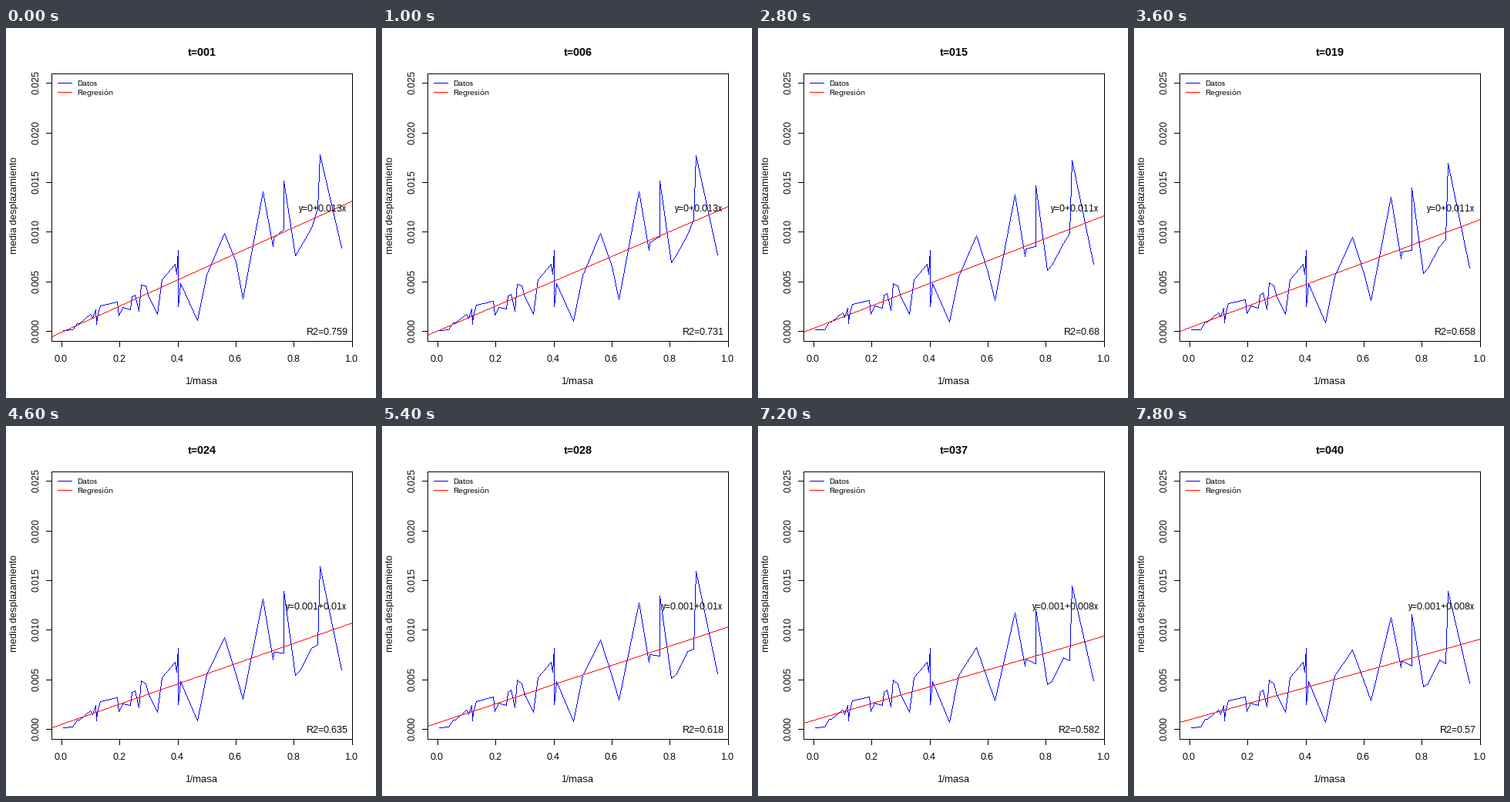
Write a matplotlib script that moves like this. It is 480 px wide and 480 px high and loops after 8 s.

```python
import matplotlib.pyplot as plt
import numpy as np
from matplotlib.animation import FuncAnimation

SIZE, DPI, FRAMES, STEP_MS = 480, 100, 40, 200
PT = 72 / DPI                                  # points per pixel
LEFT, RIGHT, TOP, BOTTOM = 59, 449, 59, 406    # plot box, pixels
X0, X_UNIT = 72.5, 376.5                       # pixel of x = 0, pixels per unit
Y0, Y_UNIT = 393.7, 12872                      # pixel of y = 0, pixels per unit
BLUE, RED = "#0000ff", "#ff0000"

plt.rcParams.update({
    "font.family": "Liberation Sans",
    "text.hinting": "native",
    "text.hinting_factor": 1,
    "text.kerning_factor": 6,
    "path.simplify": False,
})

# Heavy masses hardly move: pixel x, displacement (1e-4).
HEAVY = np.array([
    (74, 1), (86, 1.5), (92, 8), (95, 8), (109, 17), (112, 13), (116, 22),
    (117, 7), (118, 15), (122, 26), (144, 30), (146, 16), (151, 24),
    (161, 22), (163, 35), (167, 37), (172, 20), (175, 47), (181, 46),
    (185, 34), (196, 17), (202, 52), (219, 68), (221, 58), (223, 82),
    (223, 25), (226, 48),
])

# Light masses slow down: pixel x, first and last displacement (1e-4).
LIGHT = np.array([
    (248, 11, 7), (260, 57, 54), (283, 99, 80), (298, 70, 48),
    (307, 33, 29), (333, 141, 113), (346, 86, 62), (347, 94, 69),
    (360, 103, 64), (360, 152, 116), (375, 76, 43), (381, 84, 46),
    (396, 104, 70), (404, 124, 66), (407, 178, 139), (435, 84, 47),
])

# Goodness of fit at a few steps.
R2_T = (1, 10, 19, 24, 28, 33, 40)
R2 = (.759, .708, .658, .635, .618, .597, .57)

fig = plt.figure(figsize=(SIZE / DPI, SIZE / DPI), dpi=DPI, facecolor="white")
ax = fig.add_axes((0, 0, 1, 1))
ax.set(xlim=(0, SIZE), ylim=(SIZE, 0))
ax.axis("off")


def pixel_path(xs, ys):
    """Unit dashes over each pixel of a hard-edged, one pixel wide polyline."""
    xs, ys = np.floor(xs), np.floor(ys)
    px, py = [], []
    for x1, y1, x2, y2 in zip(xs, ys, xs[1:], ys[1:]):
        n = int(max(abs(x2 - x1), abs(y2 - y1))) + 1
        px.append(np.floor(np.linspace(x1, x2, n) + .5))
        py.append(np.floor(np.linspace(y1, y2, n) + .5))
    px, py = np.concatenate(px), np.concatenate(py) + .5
    gap = np.full_like(px, np.nan)
    return np.c_[px, px + 1, gap].ravel(), np.c_[py, py, gap].ravel()


def stroke(xs, ys, color="black"):
    return ax.plot(*pixel_path(xs, ys), color=color, lw=PT, snap=False,
                   solid_capstyle="butt")[0]


def label(x, y, text, px=12, ha="center", **kw):
    return ax.text(x, y, text, size=px * PT, ha=ha, va="baseline", **kw)


def upright(x, y, text):
    label(x, y, text, rotation=90, rotation_mode="anchor")


def to_y(value):
    return Y0 - value * Y_UNIT


def data_y(u):
    x, y = HEAVY.T
    heavy = y + np.where(x < 180, 3 * (1 - (1 - u) ** 2) * y / (y + 4), 0)
    x, first, last = LIGHT.T
    steep = first / (x - X0) * X_UNIT > 160
    light = first + (last - first) * u ** np.where(steep, 2, .8)
    return to_y(np.concatenate([heavy, light]) * 1e-4)


def fit_at(u):
    """Intercept and slope of the regression line."""
    return (-.07 + 1.08 * u) * 1e-3, (13.18 - 5.09 * u) * 1e-3


data_x = np.concatenate([HEAVY[:, 0], LIGHT[:, 0]])
data = stroke(data_x, data_y(0), BLUE)
fit = stroke([LEFT, RIGHT], [BOTTOM, TOP], RED)

stroke([LEFT, RIGHT, RIGHT, LEFT, LEFT], [TOP, TOP, BOTTOM, BOTTOM, TOP])
for k in range(6):
    x = X0 + k * .2 * X_UNIT
    stroke([x, x], [BOTTOM, BOTTOM + 7])
    label(x - 1, 433, f"{k * .2:.1f}")
    y = to_y(k * .005)
    stroke([LEFT - 7, LEFT], [y, y])
    upright(43, y - 1, f"{k * .005:.3f}")
label(253.5, 462, "1/masa")
upright(14, 230, "media desplazamiento")

for row, name, color in ((71, "Datos", BLUE), (83, "Regresión", RED)):
    stroke([67, 85], [row, row], color)
    label(92.5, row + 4, name, 10, "left")

title = label(254, 36, "", 14, weight="bold")
formula = label(441.5, 238, "", ha="right")
score = label(444, 398, "", ha="right")


def draw(i):
    t, u = i + 1, i / (FRAMES - 1)
    a, b = fit_at(u)
    ends = np.array([LEFT, RIGHT])
    data.set_data(*pixel_path(data_x, data_y(u)))
    fit.set_data(*pixel_path(ends, to_y(a + b * (ends - X0) / X_UNIT)))
    title.set_text(f"t={t:03d}")
    formula.set_text(f"y={round(a, 3) + 0.0:g}+{round(b, 3):g}x")
    score.set_text(f"R2={round(np.interp(t, R2_T, R2), 3):g}")
    return data, fit, title, formula, score


anim = FuncAnimation(fig, draw, frames=FRAMES, interval=STEP_MS,
                     repeat=True, repeat_delay=0, blit=False)
plt.show()
```
